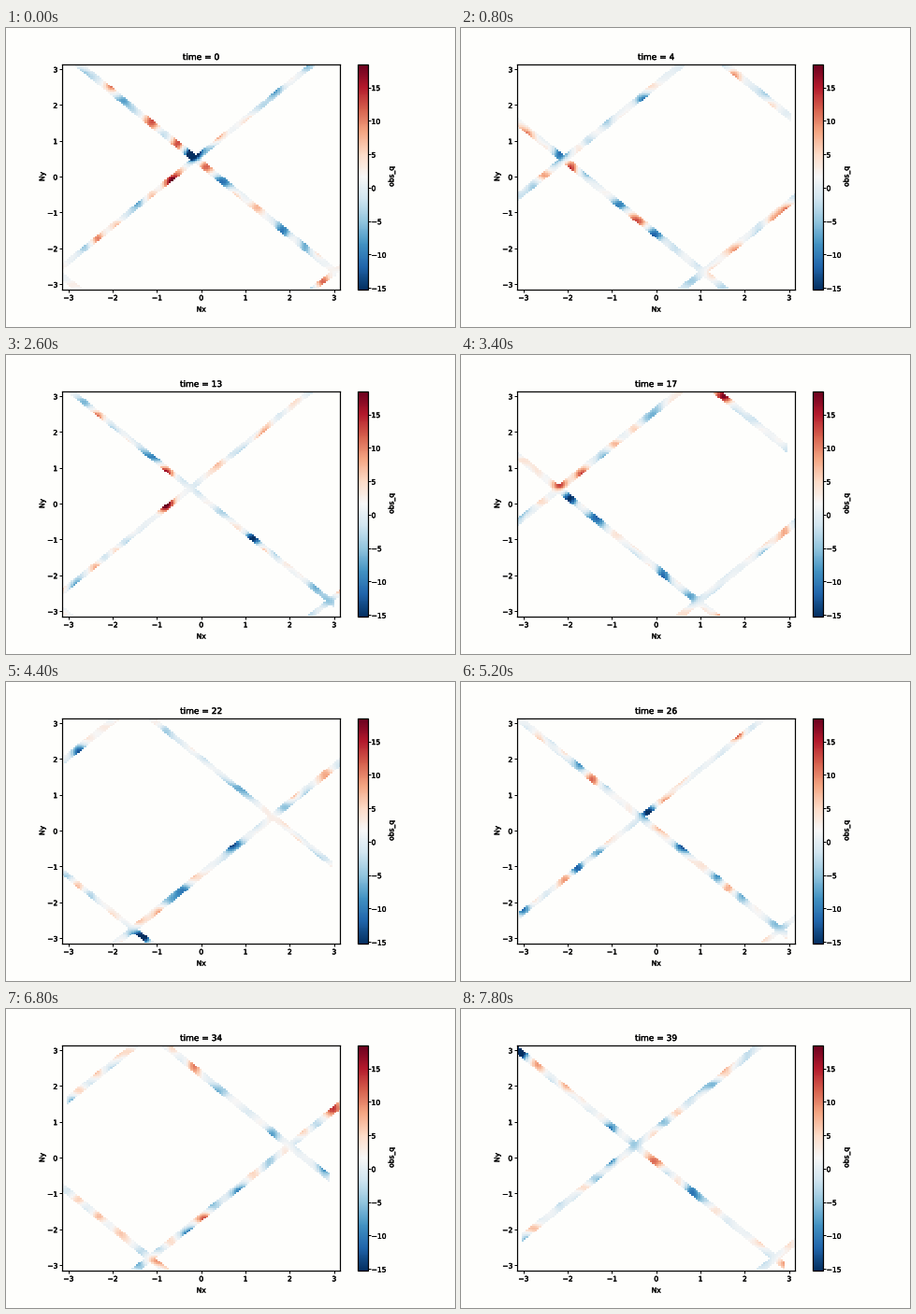
A matplotlib script for the animation above (8 s loop, 480 by 320 pixels).

```python
import numpy as np
import matplotlib.pyplot as plt
from matplotlib.animation import FuncAnimation
from matplotlib.colors import Normalize
from matplotlib.patheffects import withStroke
from matplotlib.text import Text

W, H = 480, 320
N = 128
STEPS = 40
HALF_WIDTH = 0.115
PAPER = "#fefefc"

plt.rcParams.update({
    "font.family": "DejaVu Sans", "font.size": 6.8,
    "axes.titlesize": 8.1, "axes.titlepad": 4, "axes.linewidth": 1.1,
    "axes.facecolor": PAPER, "figure.facecolor": PAPER,
})
for tick in ("xtick", "ytick"):
    plt.rcParams.update({f"{tick}.major.size": 2.3, f"{tick}.major.pad": 2.1,
                         f"{tick}.major.width": 0.9})

edges = np.linspace(-np.pi, np.pi, N + 1)
centres = (edges[1:] + edges[:-1]) / 2
X, Y = np.meshgrid(centres, centres)

# Turbulent field: periodic plane waves, each turning at its own rate
rng = np.random.default_rng(7)
WAVES = 40
angle = rng.uniform(0, 2 * np.pi, WAVES)
length = rng.uniform(3, 11, WAVES)
kx = np.round(length * np.cos(angle))
ky = np.round(length * np.sin(angle))
phase = rng.uniform(0, 2 * np.pi, WAVES)
rate = rng.uniform(-0.6, 0.6, WAVES)


def wrap(a):
    return (a + np.pi) % (2 * np.pi) - np.pi


def vorticity(x, y, t):
    arg = np.outer(x, kx) + np.outer(y, ky) + phase + rate * t
    f = np.sin(arg).sum(axis=1) * np.sqrt(2 / WAVES)
    # Calm background with a few strong eddies
    return 0.8 + 3.4 * f * np.sqrt(abs(f))


def observe(t):
    # The two tracks meet at (cx, cy), which drifts at a steady rate
    cx, cy = -.13 - .492 * t, .48 - .0045 * t
    rising = abs(wrap(Y - cy - (X - cx))) < HALF_WIDTH
    falling = abs(wrap(Y - cy + (X - cx))) < HALF_WIDTH
    rising &= X > -3.2 + .0042 * t
    falling &= X < 3.04 - .0042 * t
    seen = rising | falling
    q = np.full((N, N), np.nan)
    q[seen] = vorticity(X[seen], Y[seen], t)
    return np.ma.masked_invalid(q)


def add_axes(x, width):
    return fig.add_axes([x / W, 40.5 / H, width / W, 241 / H])


fig = plt.figure(figsize=(6, 4), dpi=80)
ax = add_axes(60, 297.4)
cax = add_axes(376.2, 10.3)

image = ax.imshow(observe(0), cmap="RdBu_r", norm=Normalize(-15.2, 18.5),
                  extent=(-np.pi, np.pi, -np.pi, np.pi), origin="lower",
                  aspect="auto", interpolation="nearest")
ax.set(xticks=range(-3, 4), yticks=range(-3, 4))
ax.set_xlabel("Nx", labelpad=2.8)
ax.set_ylabel("Ny", labelpad=0.9)
title = ax.set_title("time = 0")
bar = fig.colorbar(image, cax=cax, ticks=range(-15, 16, 5))
bar.set_label("obs_q", labelpad=0.9)
cax.tick_params(pad=1.4)

for text in fig.findobj(Text):
    text.set_path_effects([withStroke(linewidth=0.35, foreground="black")])


def update(t):
    image.set_data(observe(t))
    title.set_text(f"time = {t}")
    return image, title


anim = FuncAnimation(fig, update, frames=STEPS, interval=200,
                     repeat=True, repeat_delay=0, blit=False)
plt.show()
```
